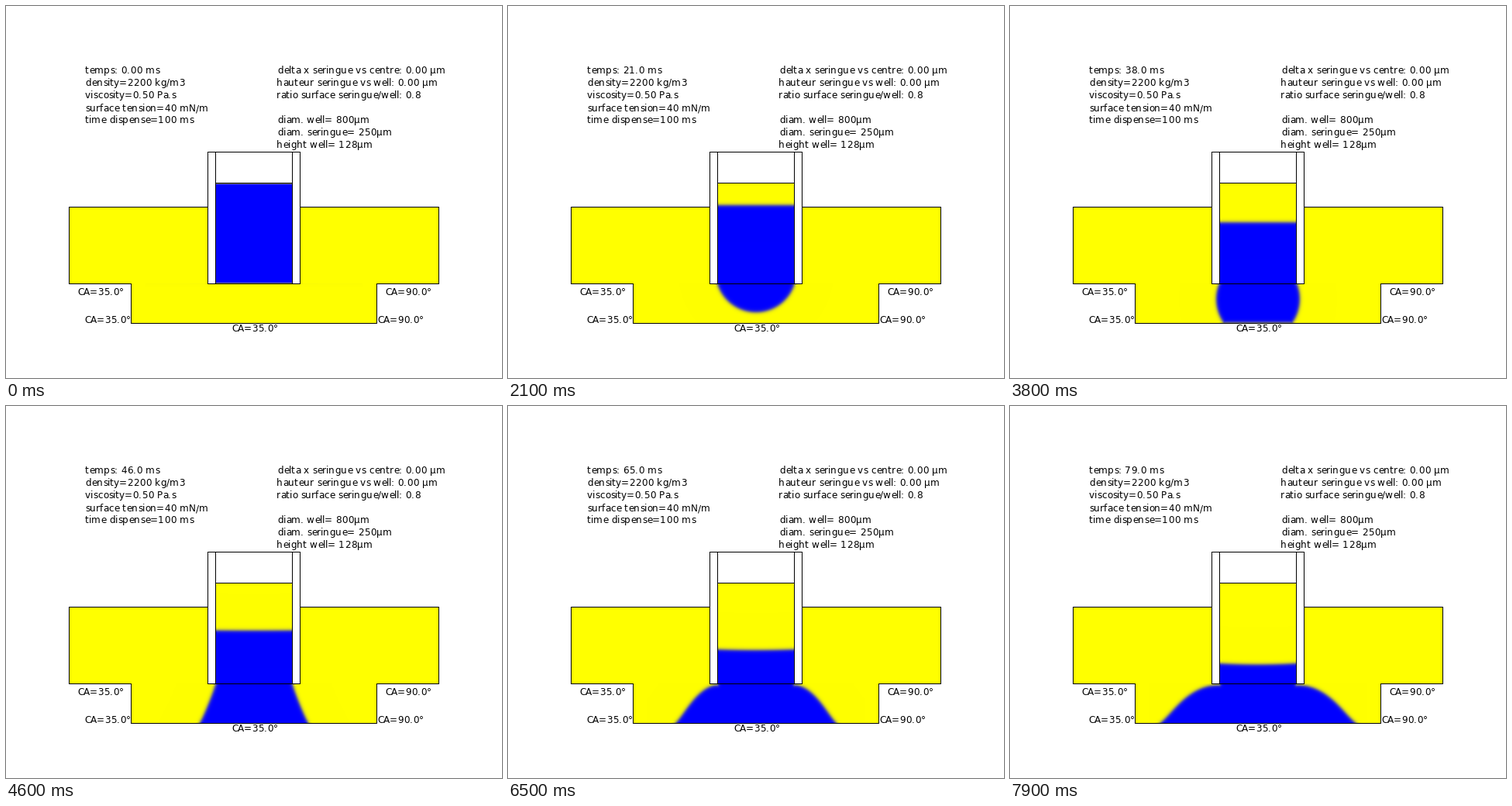
Write a matplotlib script that moves like this. It is 640 px wide and 480 px high and loops after 8000 ms.

```python
from functools import lru_cache

import numpy as np
import matplotlib.pyplot as plt
from matplotlib.animation import FuncAnimation
from matplotlib.textpath import text_to_path

W, H, DPI = 640, 480, 100
FRAMES, STEP = 80, 100
MID, LIP, FLOOR = 320, 358, 409      # axis, nozzle outlet, well bottom
BORE, TOP = 50, 229                  # half bore, first liquid row
DEPTH = FLOOR - LIP
RATE = 1.305                         # level drop, px per ms
SPAN = 140                           # half width of the computed field
TOUCH, WET = 31, 38                  # drop meets the floor, starts to spread
YELLOW, BLUE = np.array([1, 1, 0]), np.array([0, 0, 1])

plt.rcParams.update({"font.family": "DejaVu Sans", "font.size": 12 * 72 / DPI})

# Area of the hanging circular drop, cut by the floor, against its depth
depths = np.linspace(.01, 80, 400)
rows = (np.arange(204) + .5) / 4
centres = (depths**2 - BORE**2) / (2 * depths)
chords = (BORE**2 + centres**2)[:, None] - (rows - centres[:, None])**2
areas = np.sqrt(np.clip(chords, 0, None)).sum(1) / 2

X, Y = np.meshgrid(np.arange(SPAN) + .5, np.arange(TOP, FLOOR) + .5)
below = Y[:, 0] > LIP
dx, dy = X[below], Y[below] - LIP


def hanging(t):
    """Signed distance to the circular drop below the nozzle."""
    squeeze = np.clip((t - TOUCH) / (WET - TOUCH), 0, 1)
    area = 2 * BORE * RATE * t * (1 + .06 * squeeze)
    h = np.interp(area, areas, depths)
    c = (h * h - BORE**2) / (2 * h)
    return np.hypot(BORE, c) - np.hypot(dx, dy - c)


def profile(t):
    """Half width and height of the wetting drop, from the nozzle down."""
    foot = np.interp(t, [38, 42, 46, 54, 65, 79], [44, 56, 70, 85, 103.5, 126])
    power = np.interp(t, [38, 46, 54, 65, 79], [1, 1.1, .72, .54, .47])
    bulge = np.interp(t, [38, 46], [6.6, 0])
    lip = np.interp(t, [38, 46], [0, 2])
    u = np.linspace(0, 1, 30)**2
    w = BORE + (foot - BORE) * (.95 * u**power + .05 * u**6) + bulge * 4 * u * (1 - u)
    pts = np.column_stack([w, lip + (DEPTH - lip) * u])
    end = pts[-1] + 4 * (pts[-1] - pts[-2])     # run on below the floor
    return np.vstack([[BORE, -.01], pts, end])


def spreading(t):
    """Signed distance to the drop that wets the floor."""
    curve = profile(t)
    best = np.full(dx.shape, 1e9)
    for (px, py), (vx, vy) in zip(curve, np.diff(curve, axis=0)):
        k = np.clip(((dx - px) * vx + (dy - py) * vy) / (vx * vx + vy * vy), 0, 1)
        best = np.minimum(best, np.hypot(dx - px - k * vx, dy - py - k * vy))
    edge = np.interp(dy[:, 0], curve[:, 1], curve[:, 0])[:, None]
    return np.where(dx < edge, best, -best)


def field(t):
    """RGBA picture of both fluids at time t in ms."""
    bow = 1.5 * np.clip((t - 40) / 40, 0, 1)
    level = TOP + .5 + RATE * t + bow * (.6 - (X / BORE)**2)
    phi = np.minimum(Y - level, LIP - .5 + 3 * t - Y)
    drop = hanging(t) if t <= WET else spreading(t)
    if t > TOUCH:
        film = np.interp(t, [WET, 42], [0, 6])
        drop = np.minimum(drop, DEPTH - dy + film)
    phi[below] = drop
    soft = np.interp(t, [0, 4], [.25, 2.6])
    mix = (.5 + .5 * np.tanh(phi / soft))[..., None]
    rgba = np.ones(phi.shape + (4,))
    rgba[..., :3] = YELLOW + mix * (BLUE - YELLOW)
    rgba[~below, BORE:, 3] = 0
    return np.hstack([rgba[:, ::-1], rgba])


fig = plt.figure(figsize=(W / DPI, H / DPI), dpi=DPI, facecolor="white")
ax = fig.add_axes([0, 0, 1, 1])
ax.set_axis_off()
font = ax.title.get_fontproperties().copy()
font.set_size(12 * 72 / DPI)


def outline(pts, fill, z):
    x, y = np.array(pts).T + .5
    ax.fill(x, y, fc=fill, ec="none", aa=False, snap=False, zorder=z)
    ax.plot(np.r_[x, x[0]], np.r_[y, y[0]], color="k", lw=72 / DPI, aa=False,
            snap=False, zorder=z + 2, solid_capstyle="projecting",
            solid_joinstyle="miter")


def box(x0, y0, x1, y1, fill, z=2):
    outline([(x0, y0), (x1, y0), (x1, y1), (x0, y1)], fill, z)


@lru_cache(None)
def advance(c):
    """Advance of one character, rounded to whole pixels."""
    def width(s):
        return text_to_path.get_text_width_height_descent(s, font, False)[0]
    return round((width(f"|{c}|") - width("||")) * DPI / 72)


def label(x, y, s):
    """Text set on the pixel grid, one character at a time."""
    glyphs = []
    for c in s:
        if c != " ":
            glyphs.append(ax.text(x, y, c, va="baseline", ha="left", zorder=9))
        x += advance(c)
    return glyphs


outline([(81, 259), (260, 259), (260, 358), (379, 358), (379, 259), (558, 259),
         (558, 358), (478, 358), (478, 409), (161, 409), (161, 358), (81, 358)],
        "yellow", 1)
image = ax.imshow(field(0), extent=(MID - SPAN, MID + SPAN, FLOOR, TOP),
                  interpolation="nearest", zorder=2.5)
box(270, 188, 369, 228, "white")
box(270, 228, 369, 358, "none")
box(260, 188, 270, 358, "white")
box(369, 188, 379, 358, "white")
ax.set(xlim=(0, W), ylim=(H, 0), aspect="auto")

for x, y, s in [
    (102, 103, "density=2200 kg/m3"),
    (102, 119, "viscosity=0.50 Pa.s"),
    (102, 136, "surface tension=40 mN/m"),
    (102, 151, "time dispense=100 ms"),
    (350, 87, "delta x seringue vs centre: 0.00 µm"),
    (349, 103, "hauteur seringue vs well: 0.00 µm"),
    (349, 119, "ratio surface seringue/well: 0.8"),
    (350, 151, "diam. well= 800µm"),
    (350, 167, "diam. seringue= 250µm"),
    (349, 183, "height well= 128µm"),
    (92, 373, "CA=35.0°"),
    (101, 409, "CA=35.0°"),
    (291, 420, "CA=35.0°"),
    (489, 373, "CA=90.0°"),
    (479, 409, "CA=90.0°"),
]:
    label(x, y, s)

clock = []


def update(t):
    for glyph in clock:
        glyph.remove()
    clock[:] = label(102, 87, f"temps: {t:.{2 if t < 10 else 1}f} ms")
    image.set_data(field(t))
    return [image, *clock]


anim = FuncAnimation(fig, update, frames=FRAMES, interval=STEP, repeat=True,
                     repeat_delay=0, init_func=lambda: [image])
plt.show()
```
